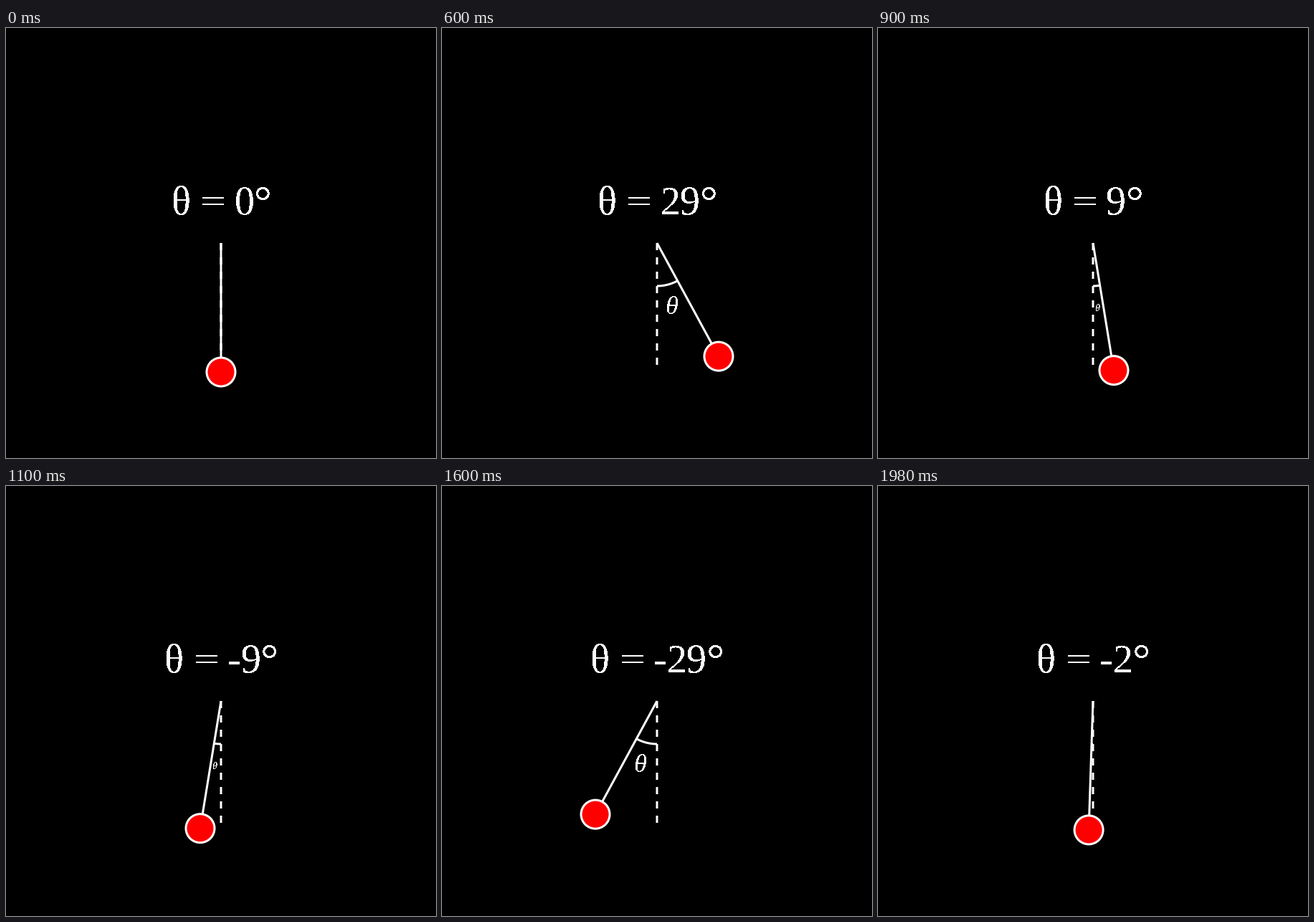
Animation, 600 px wide and 600 px high, one loop 2000 ms. Source, as a matplotlib script:

```python
import numpy as np
import matplotlib.pyplot as plt
from matplotlib.animation import FuncAnimation
from matplotlib.patches import Circle

SIZE, DPI = 600, 100
PX = 72 / DPI              # points per pixel
FRAMES, INTERVAL = 100, 20
AMPLITUDE = 30             # degrees
LENGTH, ARC_R, LABEL_R = 180, 60, 90
PIVOT = np.array([300, 300])
EM, LABEL_PX = 56, 36
BASELINE = 260

plt.rcParams.update({
    "font.family": "Liberation Serif",
    "text.hinting": "default",
    "text.hinting_factor": 1,
})

fig = plt.figure(figsize=(SIZE / DPI, SIZE / DPI), dpi=DPI, facecolor="black")
ax = fig.add_axes([0, 0, 1, 1])
ax.set_xlim(0, SIZE)
ax.set_ylim(SIZE, 0)
ax.axis("off")


def polar(radius, angle):
    """Point at an angle measured from straight down."""
    return (PIVOT[0] + radius * np.sin(angle),
            PIVOT[1] + radius * np.cos(angle))


def stroke(xs=(), ys=(), width=3, **style):
    line, = ax.plot(xs, ys, color="white", lw=width * PX, snap=False,
                    solid_capstyle="butt", **style)
    return line


def label(string="", size=EM, **style):
    return ax.text(0, BASELINE, string, color="white", fontsize=size * PX,
                   ha="left", va="baseline", antialiased=False, zorder=4,
                   **style)


def bar(y, width):
    return stroke([0, 0], [y, y], width, antialiased=False)


stroke([300, 300], [300, 470], ls=(0, (10 / 3, 10 / 3)))
arc = stroke()
rod = stroke()
bob = ax.add_patch(Circle((0, 0), 20, fc="red", ec="white", lw=3 * PX,
                          snap=False, zorder=3))

symbol = label("θ")
equals = [bar(237, 2), bar(246, 2)]
minus = bar(247, 4)
digits = label()
degree = ax.add_patch(Circle((0, 0), 7.75, fc="none", ec="white", lw=2 * PX,
                             snap=False, antialiased=False))
theta = label("θ", LABEL_PX, style="italic")


def set_title(value):
    """Lay out "θ = value°" centred over the pivot."""
    number = str(abs(value))
    sign = 0.333 if value < 0 else 0
    left = PIVOT[0] - EM * (1.964 + sign + 0.5 * len(number)) / 2

    symbol.set_x(left)
    for line in equals:
        line.set_xdata([left + 0.78 * EM, left + 1.3 * EM])
    x = left + 1.564 * EM
    minus.set_visible(value < 0)
    minus.set_xdata([x + 0.039 * EM, x + 0.285 * EM])
    x += sign * EM
    digits.set_text(number)
    digits.set_x(x)
    degree.center = x + (0.5 * len(number) + 0.21) * EM, 231


def update(i):
    degrees = AMPLITUDE * np.sin(2 * np.pi * i / FRAMES)
    angle = np.radians(degrees)
    end = polar(LENGTH, angle)

    rod.set_data([PIVOT[0], end[0]], [PIVOT[1], end[1]])
    arc.set_data(*polar(ARC_R, np.linspace(0, angle, 40)))
    bob.center = end
    set_title(int(round(degrees)))

    # The label shrinks to fit the gap between rod and vertical.
    size = min(LABEL_PX, LABEL_R * abs(angle))
    x, y = polar(LABEL_R, angle / 2)
    theta.set_visible(size > 3.5)
    theta.set_fontsize(max(size, 1) * PX)
    theta.set_position((x - 0.28 * size, y + 0.34 * size))
    return rod, arc, bob, symbol, *equals, minus, digits, degree, theta


anim = FuncAnimation(fig, update, frames=FRAMES, interval=INTERVAL,
                     repeat=True, repeat_delay=0)
plt.show()
```
